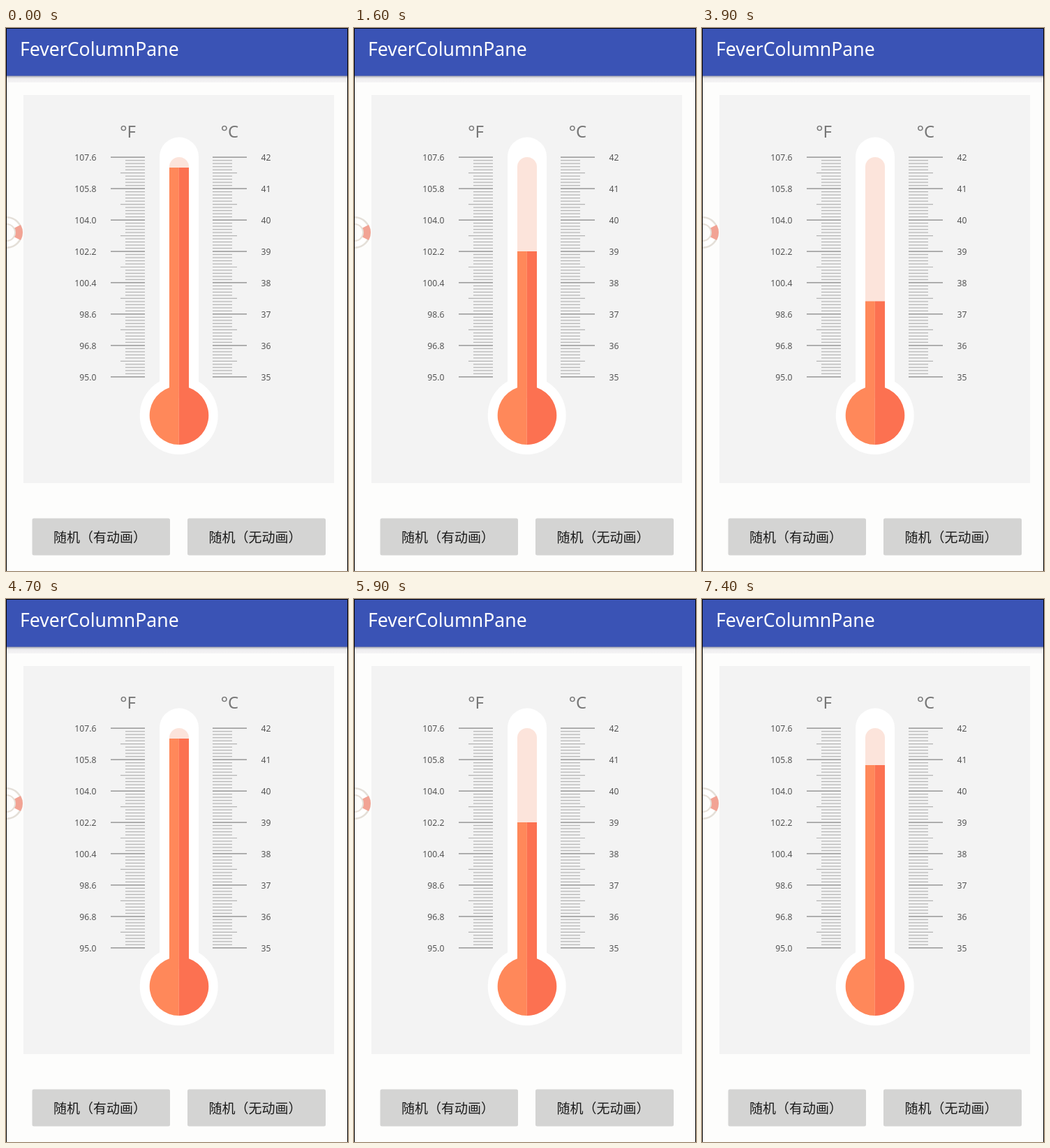
An HTML page for the animation above (8000 ms loop, 490 by 778 pixels).

```html
<!DOCTYPE html>
<html lang="zh-CN">
<head>
<meta charset="utf-8">
<title>Thermometer</title>
<style>
  html, body { margin: 0; width: 100%; height: 100%; overflow: hidden; background: #fdfdfc; }
  svg { display: block; width: 490px; height: 778px; font-family: "Noto Sans", "Open Sans", sans-serif; }
  .label { font-size: 12.2px; fill: #555; }
  .unit { font-size: 24px; fill: #777; text-anchor: middle; }
  .button { font: 500 19px "Noto Sans CJK SC", "Noto Sans CJK", "Noto Sans CJK JP", sans-serif; fill: #1b1b1b; }
</style>
</head>
<body>
<svg viewBox="0 0 490 778">
  <defs>
    <linearGradient id="shade" x1="0" y1="0" x2="0" y2="1">
      <stop offset="0" stop-color="#85899c"/>
      <stop offset=".2" stop-color="#c9c9ce"/>
      <stop offset=".45" stop-color="#eeedef"/>
      <stop offset="1" stop-color="#f5f4f5"/>
    </linearGradient>
  </defs>
  <rect width="490" height="778" fill="#fdfdfc"/>

  <rect y="68" width="490" height="10" fill="url(#shade)"/>
  <rect width="490" height="68.5" fill="#3a53b5"/>
  <text x="20" y="39.5" font-size="26.6" fill="#fff">FeverColumnPane</text>

  <rect x="25" y="96" width="445" height="556" fill="#f3f3f3"/>
  <text class="unit" x="174.5" y="157">°F</text>
  <text class="unit" x="320.5" y="157">°C</text>
  <g id="scale"></g>

  <g fill="#fff">
    <rect x="220" y="156.5" width="56" height="400" rx="28"/>
    <circle cx="247.7" cy="555" r="56"/>
  </g>
  <path d="M234 530V199a14 14 0 0 1 28 0V530Z" fill="#fce4db"/>
  <path id="warm" fill="#ff885a"/>
  <path id="hot" fill="#fc7151"/>

  <g id="buoy">
    <circle cx="1" cy="293" r="21.7" fill="#fff" stroke="#e4dfd8" stroke-width="2.6"/>
    <path d="M11 287L21 282A23 23 0 0 1 21 304L11 299A12 12 0 0 0 11 287Z" fill="#f2a394"/>
    <circle cx="1" cy="293" r="12" fill="#fdfdfc" stroke="#e6dfd7" stroke-width="2"/>
  </g>

  <rect id="left" x="37.5" y="702.5" width="197.5" height="53" rx="2.5"/>
  <rect id="right" x="260" y="702.5" width="198" height="53" rx="2.5"/>
  <text class="button" x="68" y="737">随机（有动画）</text>
  <text class="button" x="290.5" y="737">随机（无动画）</text>

  <path d="M.5 778V.5H489.5V778" fill="none" stroke="#000"/>
</svg>
<script>
const LOOP = 8000, STEP = 100;
const TOP = 185, BOTTOM = 499.6, DEGREE = (BOTTOM - TOP) / 7;
const MID = 247.8;

// Level changes: start time, duration (0 = jump), target y
const moves = [
  [1100, 500, 320],
  [2200, 0, 460],
  [3300, 0, BOTTOM],
  [3695, 500, 200],
  [5400, 500, 320],
  [7400, 0, 238]
];
const presses = {
  left: [[900, 1100], [5200, 5400]],
  right: [[7200, 7400]]
};

const byId = id => document.getElementById(id);

function drawScale() {
  const out = [];
  const tick = (x1, x2, y, color) =>
    out.push(`<path d="M${x1} ${y}H${x2}" stroke="${color}" stroke-width="1.2"/>`);
  for (let i = 0; i <= 70; i++) {
    const y = +(TOP + i * DEGREE / 10 + .2).toFixed(2);
    const whole = i % 10 === 0;
    const size = whole ? 49 : i % 5 === 0 ? 35 : 28;
    const color = whole ? "#858585" : "#b4b4b4";
    tick(199 - size, 199, y, color);
    tick(296, 296 + size, y, color);
    if (whole) {
      const c = 42 - i / 10;
      const f = (c * 1.8 + 32).toFixed(1);
      out.push(`<text class="label" x="129.5" y="${y + 4.8}" text-anchor="end">${f}</text>`);
      out.push(`<text class="label" x="365.5" y="${y + 4.8}">${c}</text>`);
    }
  }
  byId("scale").innerHTML = out.join("");
}

const ease = x => (1 - Math.cos(Math.PI * x)) / 2;

function levelAt(t) {
  let y = 200;
  for (const [start, length, target] of moves) {
    if (t < start) break;
    const x = length ? Math.min(1, (t - start) / length) : 1;
    y += (target - y) * ease(x);
  }
  return y;
}

function render(time) {
  const t = Math.floor(time % LOOP / STEP) * STEP;
  const y = levelAt(t).toFixed(2);
  // Each half is a column joined to half of the bulb
  byId("warm").setAttribute("d", `M${MID} ${y}H234V515.3A42 42 0 0 0 ${MID} 597Z`);
  byId("hot").setAttribute("d", `M${MID} ${y}H262V515.3A42 42 0 0 1 ${MID} 597Z`);
  for (const id in presses) {
    const down = presses[id].some(([a, b]) => t >= a && t < b);
    byId(id).setAttribute("fill", down ? "#b8b8b7" : "#d4d4d3");
  }
}

drawScale();
render(0);
let origin;
function frame(now) {
  origin ??= now;
  render(now - origin);
  requestAnimationFrame(frame);
}
requestAnimationFrame(frame);
</script>
</body>
</html>
```
